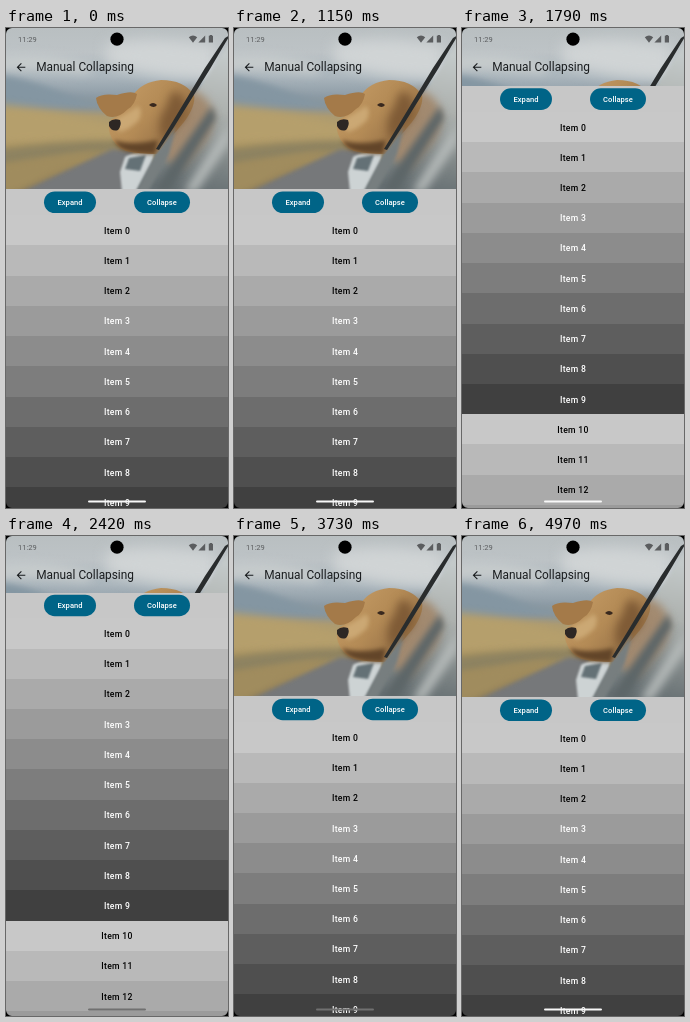
An HTML page with a canvas that plays this animation: 222x480 px, repeating every 5 s.

```html
<!DOCTYPE html>
<html lang="en">
<head>
<meta charset="utf-8">
<title>Manual Collapsing</title>
<style>
html, body { margin: 0; width: 100%; height: 100%; overflow: hidden; background: #000; }
canvas { display: block; width: 222px; height: 480px; }
</style>
</head>
<body>
<canvas id="stage"></canvas>
<script>
const W = 222, H = 480, LOOP = 5000;
const DP = W / 411.4;
const OPEN = 161.3, CLOSED = 56.5;
const ROW = 56 * DP, BAR = 48 * DP;
const COLLAPSE_AT = 1485, EXPAND_AT = 3385;
const ratio = Math.max(1, window.devicePixelRatio || 1);

function makeCanvas(canvas, w, h) {
  canvas.width = Math.round(w * ratio);
  canvas.height = Math.round(h * ratio);
  const c = canvas.getContext('2d');
  c.scale(ratio, ratio);
  return c;
}

const stage = document.getElementById('stage');
const ctx = makeCanvas(stage, W, H);
const photo = document.createElement('canvas');
const scenery = makeCanvas(photo, W, 162);

function shape(c, fill, d, blur = 0) {
  c.save();
  c.filter = blur ? `blur(${blur * ratio}px)` : 'none';
  c.fillStyle = fill;
  c.fill(new Path2D(d));
  c.restore();
}

function gradient(c, x0, y0, x1, y1, stops) {
  const g = c.createLinearGradient(x0, y0, x1, y1);
  stops.forEach(([at, color]) => g.addColorStop(at, color));
  return g;
}

function paintPhoto(c) {
  // Sky, hills, field and road
  c.fillStyle = gradient(c, 0, 0, 0, 162, [
    [0, '#b9bfc1'], [0.15, '#bdc3c6'], [0.3, '#aab5bc'], [0.42, '#8e9ca6'],
    [0.49, '#929590'], [0.55, '#ab9a72'], [0.75, '#ab945f'], [1, '#8c7b58']
  ]);
  c.fillRect(0, 0, W, 162);
  shape(c, '#d0d4d5', 'M100 16Q150 6 210 18V52Q150 52 100 36Z', 7);
  shape(c, '#c6cbcc', 'M-10 28Q40 22 90 38L80 46Q30 40 -10 42Z', 5);
  shape(c, '#8496a2', 'M-10 46Q22 50 50 62T110 73V80H-10Z', 3);
  shape(c, '#b59f6c', 'M-10 76Q50 82 112 96V112L-10 116Z', 4);
  shape(c, '#8e8361', 'M-10 122Q50 113 112 113V122L-10 138Z', 3);
  shape(c, '#76787a', 'M106 121L128 122L126 170H0Z', 2);
  shape(c, '#a08c5e', 'M-10 138L92 122L14 162L-10 168Z', 3);

  // Car and window glass
  shape(c, '#cdd3d4', 'M114 144L119 129Q126 124 148 123L146 164H116Z', 0.8);
  shape(c, '#647176', 'M119 141L123 130L140 127L134 143Z', 0.9);
  shape(c, gradient(c, 200, 25, 175, 162, [
    [0, '#c3c9c9'], [0.4, '#adb1ae'], [0.7, '#858c8c'], [1, '#666f72']
  ]), 'M224 14L208 39L152 122L130 164H224Z', 0.8);

  // Dog
  shape(c, '#a28a70', 'M182 61Q202 66 207 84Q208 104 196 117L174 142L156 128Z', 4);
  shape(c, gradient(c, 110, 60, 190, 125, [
    [0, '#c49b65'], [0.4, '#b48b56'], [1, '#815e3b']
  ]), 'M127 67Q136 54 155 52Q178 52 188 67Q190 78 178 94L151 126Q133 126 120 123Q108 118 104 106Q101 97 106 91Q118 86 127 67Z', 0.6);
  shape(c, '#cba874', 'M132 78Q137 82 133 92Q124 101 114 104Q106 96 112 90Q122 85 132 78Z', 2);
  shape(c, '#a47a49', 'M90 70Q96 65 111 67Q126 62 131 66Q129 77 122 81Q111 92 101 88Q91 80 90 70Z', 0.6);
  shape(c, '#7f5b36', 'M166 64Q182 64 180 88L158 114Q148 96 160 80Z', 4);
  shape(c, '#624529', 'M108 112Q125 118 152 112L149 126Q130 126 120 123Q111 120 108 112Z', 2);
  shape(c, '#2d2724', 'M103 94Q107 90 114 92Q116 97 112 102Q106 104 103 98Z', 0.7);
  shape(c, '#38281e', 'M143 77q4-4 8 0q-3 4-8 0Z', 0.5);

  // Reflections and window edge
  shape(c, '#5d6668', 'M206 78L162 140L148 164H164L210 90Z', 3);
  shape(c, '#b4b9b8', 'M224 92L178 164H190L224 114Z', 4);
  shape(c, '#777e7f', 'M170 98L150 126L130 164H142L163 126Z', 1.5);
  shape(c, '#292c2d', 'M219 10L224 7L204 41L168 99L153 122L150 121L164 98L199 40Z', 0.5);
}

const ease = u => u <= 0 ? 0 : 1 - (1 + u) * Math.exp(-u);
const spring = (t, start) => ease((t - start) / 50);
const ramp = (t, start, length) => Math.min(1, Math.max(0, (t - start) / length));
const gray = v => `rgb(${v},${v},${v})`;
const mix = (a, b, k) => Math.round(a + (b - a) * k);

function headerHeight(t) {
  const folded = t < EXPAND_AT ? spring(t, COLLAPSE_AT) : 1 - spring(t, EXPAND_AT);
  return OPEN - (OPEN - CLOSED) * folded;
}

function label(text, x, y, size, color, { weight = 500, align = 'center', spacing = 0 } = {}) {
  ctx.font = `${weight} ${size}px Roboto, sans-serif`;
  ctx.letterSpacing = spacing + 'px';
  ctx.textAlign = align;
  ctx.textBaseline = 'alphabetic';
  ctx.fillStyle = color;
  ctx.fillText(text, x, y + size * 0.355);
}

function pill(x, y, w, h, color) {
  ctx.fillStyle = color;
  ctx.beginPath();
  ctx.roundRect(x, y, w, h, h / 2);
  ctx.fill();
}

function drawList(top) {
  for (let i = 0; top + i * ROW < H; i++) {
    const tone = i % 10, y = top + i * ROW;
    ctx.fillStyle = gray(Math.round(200 - tone * 15.1));
    ctx.fillRect(0, Math.round(y), W, ROW + 2);
    label('Item ' + i, W / 2, y + ROW / 2 + 0.4, 16 * DP, tone < 3 ? '#000' : '#fff', { spacing: 0.5 * DP });
  }
}

function drawButtons(top) {
  ctx.fillStyle = gray(199);
  ctx.fillRect(0, Math.round(top), W, Math.round(top + BAR) - Math.round(top));
  const h = 40 * DP, y = top + (BAR - h) / 2;
  [['Expand', 38, 52], ['Collapse', 128, 56]].forEach(([text, x, w]) => {
    pill(x, y, w, h, '#006487');
    label(text, x + w / 2, y + h / 2 + 0.2, 14 * DP, '#fff', { spacing: 0.1 * DP });
  });
}

function drawHeader(height) {
  ctx.save();
  ctx.beginPath();
  ctx.rect(0, 0, W, Math.round(height));
  ctx.clip();
  ctx.drawImage(photo, 0, 0, W, 162);
  ctx.restore();

  ctx.save();
  ctx.translate(15 - 12 * DP, 39.3 - 12 * DP);
  ctx.scale(DP, DP);
  shape(ctx, '#171a1c', 'M20 11H7.83l5.59-5.59L12 4l-8 8 8 8 1.41-1.41L7.83 13H20Z');
  ctx.restore();
  label('Manual Collapsing', 56 * DP, 39.1, 22 * DP, '#191c1e', { weight: 400, align: 'left' });
}

function drawStatus() {
  const ink = '#5b5d5f';
  label('11:29', 12, 11.3, 7.5, ink, { weight: 400, align: 'left' });
  shape(ctx, ink, 'M182.8 9.2Q187 6 191.2 9.2L187 14.8Z');
  shape(ctx, ink, 'M199.2 7.4V14.6H192.4Z');
  shape(ctx, ink, 'M203.8 7.8V7H206V7.8H207V14.6H202.8V7.8Z');
  ctx.fillStyle = '#000';
  ctx.beginPath();
  ctx.arc(W / 2, 11.2, 6.6, 0, Math.PI * 2);
  ctx.fill();
}

function drawCorners() {
  ctx.fillStyle = '#000';
  ctx.beginPath();
  ctx.rect(0, 0, W, H);
  ctx.roundRect(0, 0, W, H, 6);
  ctx.fill('evenodd');
}

function draw(t) {
  const height = headerHeight(t);
  const dim = ramp(t, 1950, 150) - ramp(t, 4050, 150);
  drawList(height + BAR);
  drawButtons(height);
  drawHeader(height);
  drawStatus();
  pill(82, 472.4, 58, 2.2, gray(mix(248, 112, dim)));
  drawCorners();
}

function tick() {
  draw(performance.now() % LOOP);
  requestAnimationFrame(tick);
}

paintPhoto(scenery);
tick();
</script>
</body>
</html>
```
